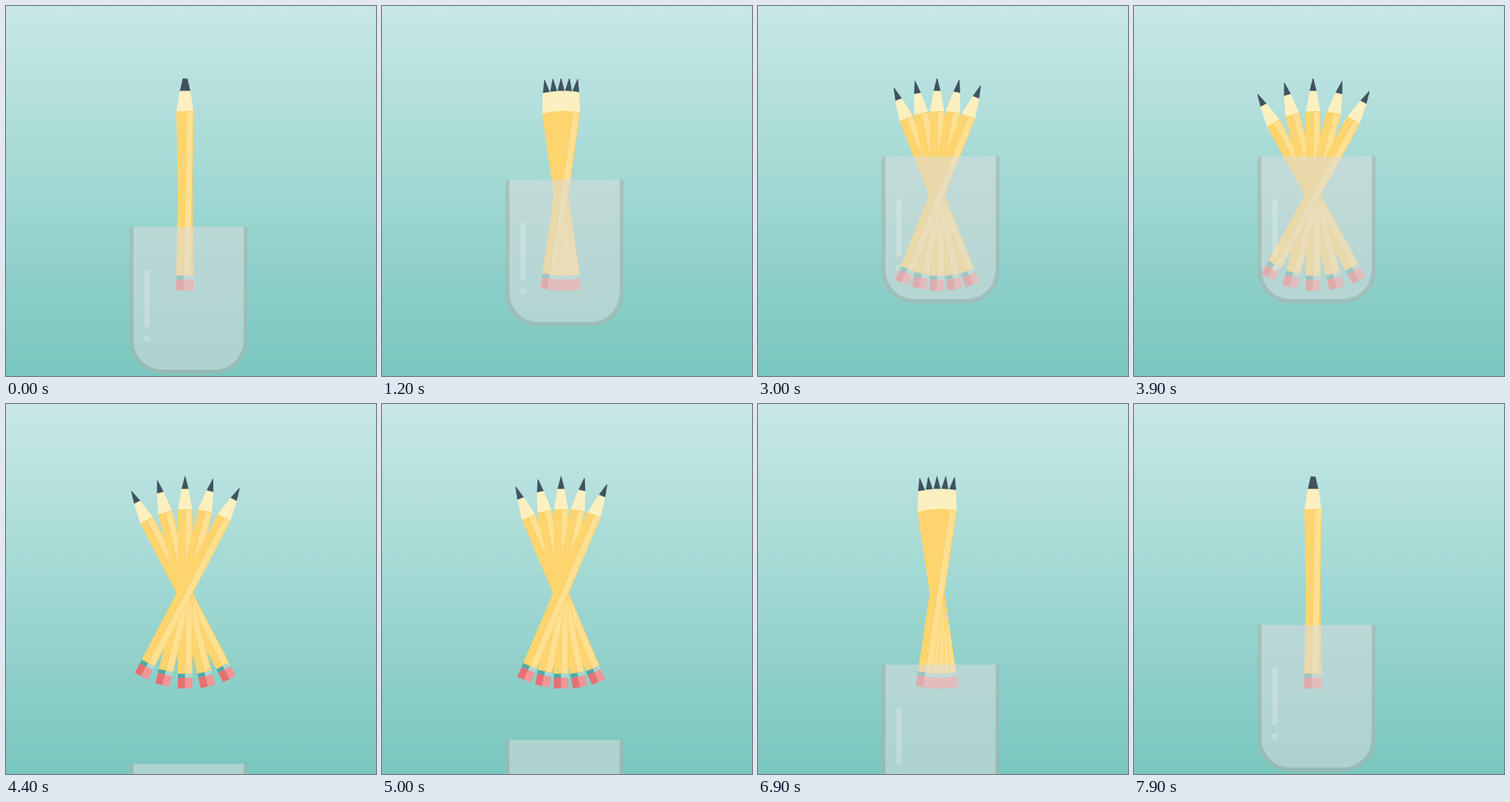
An HTML page with a canvas that plays this animation: 450x450 px, repeating every 8000 ms.

```html
<!DOCTYPE html>
<html lang="en">
<head>
<meta charset="utf-8">
<title>Pencils in a glass</title>
<style>
html, body { margin: 0; width: 100%; height: 100%; overflow: hidden; background: #a0d7d2; }
canvas { display: block; width: 100vw; height: 100vh; }
</style>
</head>
<body>
<canvas id="stage"></canvas>
<script>
const SIZE = 450, LOOP = 8000, STEP = 100;
const CYCLE = 7900, TURN = 4080;          // fan is widest and the glass restarts at TURN
const FAN = 30, PIVOT = { x: 221.5, y: 230 };
const RISE = 5600, GLASS_LOW = 453, GLASS_HIGH = 183;

const canvas = document.getElementById('stage');
const ctx = canvas.getContext('2d');

function fit() {
  const dpr = window.devicePixelRatio || 1;
  canvas.width = Math.round(innerWidth * dpr);
  canvas.height = Math.round(innerHeight * dpr);
}

function rect(color, x, y, w, h) {
  ctx.fillStyle = color;
  ctx.fillRect(x, y, w, h);
}

function poly(color, ...pts) {
  ctx.fillStyle = color;
  ctx.beginPath();
  pts.forEach(([x, y]) => ctx.lineTo(x, y));
  ctx.closePath();
  ctx.fill();
}

function background() {
  const g = ctx.createLinearGradient(0, 0, 0, SIZE);
  g.addColorStop(0, '#c8e8e6');
  g.addColorStop(1, '#78c7be');
  rect(g, 0, 0, SIZE, SIZE);
}

// Upright pencil, tip at the top, turned around the shared pivot.
function pencil(deg) {
  const l = 209, m = 217.8, r = 226.5;
  ctx.save();
  ctx.translate(PIVOT.x, PIVOT.y);
  ctx.rotate(deg * Math.PI / 180);
  ctx.translate(-PIVOT.x, -PIVOT.y);
  poly('#fcf0c0', [m - 4.2, 103], [m + 4.2, 103], [r, 128.5], [l, 128.5]);
  poly('#40535f', [m - 0.4, 88], [m + 0.4, 88], [m + 4.2, 103.3], [m - 4.2, 103.3]);
  rect('#fdd46e', l, 128, r - l, 200);
  rect('#ffe091', m, 128, r - m, 200);
  ctx.strokeStyle = '#f8cb62';
  ctx.lineWidth = 0.7;
  ctx.strokeRect(m, 128.3, r - m - 0.3, 199.7);
  rect('#4fa9a2', l, 328, m - l, 5);
  rect('#a9d6d0', m, 328, r - m, 5);
  rect('#e77072', l, 333, m - l, 13);
  rect('#f19596', m, 333, r - m, 13);
  ctx.restore();
}

// U shape open at the top.
function cupPath(x, y, w, h, r) {
  ctx.beginPath();
  ctx.moveTo(x, y);
  ctx.arcTo(x, y + h, x + w, y + h, r);
  ctx.arcTo(x + w, y + h, x + w, y, r);
  ctx.lineTo(x + w, y);
}

function glass(y) {
  cupPath(155, y, 134, 173.5, 35);
  ctx.fillStyle = 'rgba(217,221,220,0.55)';
  ctx.fill();
  cupPath(152.5, y, 139, 176, 37.5);
  ctx.strokeStyle = 'rgba(175,177,177,0.55)';
  ctx.lineWidth = 5;
  ctx.stroke();
  ctx.fillStyle = 'rgba(255,255,255,0.2)';
  for (const [top, h] of [[52, 70], [131.5, 8]]) {
    ctx.beginPath();
    ctx.roundRect(168, y + top, 7, h, 3);
    ctx.fill();
  }
}

function draw(ms) {
  const p = (ms - TURN + CYCLE) % CYCLE;
  const spread = FAN * Math.abs(1 - 2 * p / CYCLE);
  const lift = Math.min(p / RISE, 1);

  ctx.setTransform(canvas.width / SIZE, 0, 0, canvas.height / SIZE, 0, 0);
  background();
  for (let i = -2; i <= 2; i++) pencil(spread * i / 2);
  glass(GLASS_LOW + (GLASS_HIGH - GLASS_LOW) * lift);
}

const start = performance.now();
function tick() {
  const t = (performance.now() - start) % LOOP;
  draw(Math.floor(t / STEP) * STEP);
  requestAnimationFrame(tick);
}

addEventListener('resize', fit);
fit();
tick();
</script>
</body>
</html>
```
